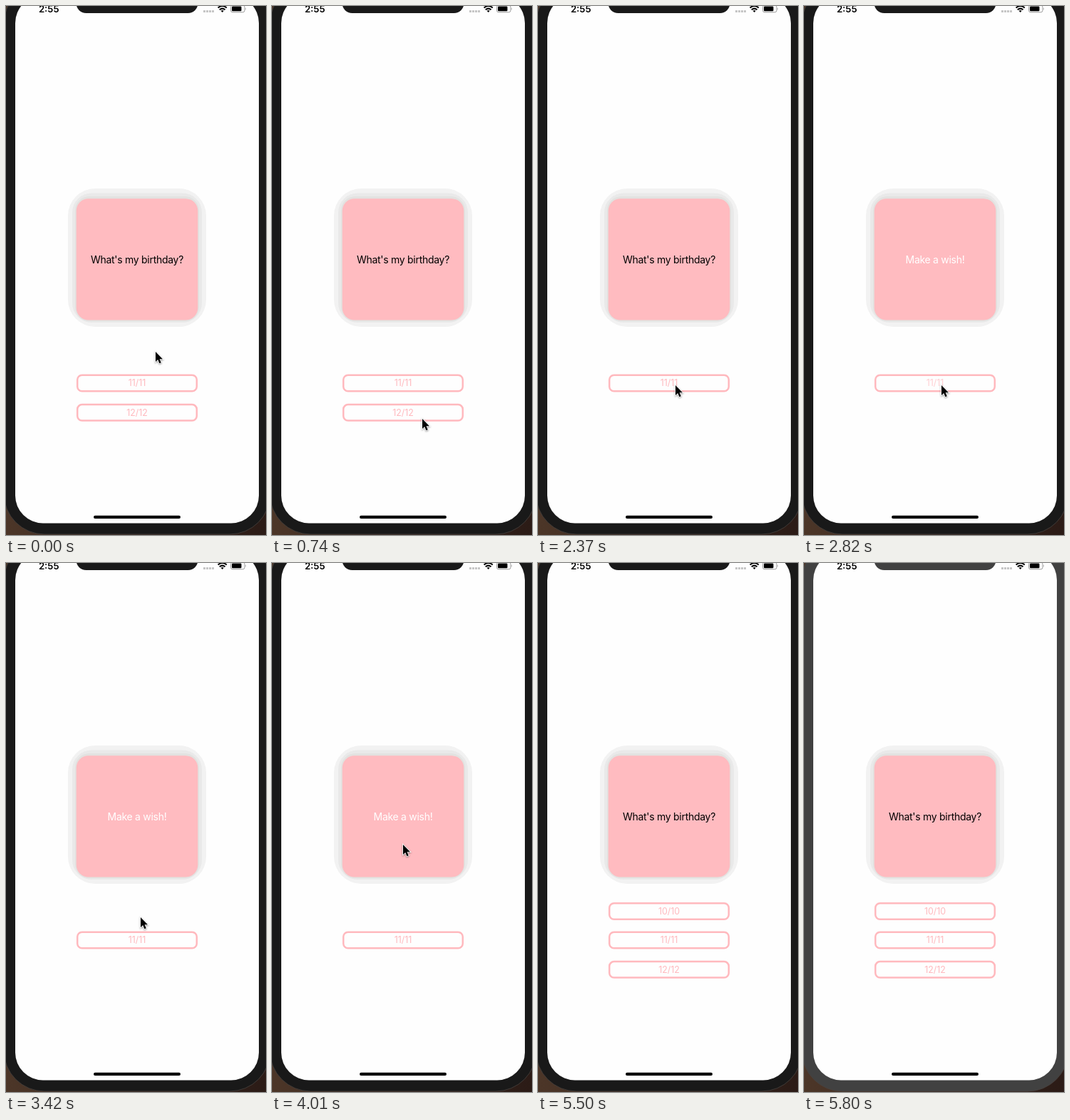
Write an HTML page that moves like this. It is 365x742 px and loops after 5.9 s.

```html
<!DOCTYPE html>
<html lang="en">
<head>
<meta charset="utf-8">
<title>Birthday quiz</title>
<style>
  html, body { margin: 0; width: 100%; height: 100%; overflow: hidden; }
  body { background: linear-gradient(90deg, #4c3628, #2b1b16); }
  svg { display: block; width: 365px; height: 742px; }
  text { font: 14px Inter, sans-serif; text-anchor: middle; letter-spacing: -.28px; }

  .bezel, .cursor, .option, .prompt, .wish, .label {
    animation: 5.9s step-end infinite;
  }
  .bezel { fill: #191919; animation-name: bezel; }
  .prompt { animation-name: prompt; }
  .wish { fill: #fff; animation-name: wish; }
  .option rect { fill: none; stroke: #ffb9be; stroke-width: 2.5; }
  .option text { fill: #ffb9be; font-size: 12.4px; letter-spacing: 0; }
  .first { animation-name: first; }
  .last { animation-name: last; }
  .label { animation-name: press; }
  .cursor { animation-name: cursor; filter: drop-shadow(0 1px .8px #0006); }

  @keyframes bezel { 0% { fill: #191919 } 98.3%, 100% { fill: #414141 } }
  @keyframes first { 0% { opacity: 0 } 75.59%, 100% { opacity: 1 } }
  @keyframes last {
    0% { opacity: 1 }
    15.08% { opacity: .8 }
    17.62% { opacity: .5 }
    20.16% { opacity: .2 }
    22.71% { opacity: 0 }
    75.59%, 100% { opacity: 1 }
  }
  @keyframes press {
    0% { opacity: 1 }
    45.25% { opacity: .4 }
    47.79% { opacity: .7 }
    50.33%, 100% { opacity: 1 }
  }
  @keyframes prompt {
    0% { opacity: 1 }
    47.79% { opacity: 0 }
    75.59%, 100% { opacity: 1 }
  }
  @keyframes wish {
    0% { opacity: 0 }
    47.79% { opacity: 1 }
    75.59%, 100% { opacity: 0 }
  }
  @keyframes cursor {
    0% { transform: translate(210px, 485px) }
    5.08% { transform: translate(217px, 551px) }
    7.62% { transform: translate(215px, 587px) }
    12.54% { transform: translate(211px, 579px) }
    15.08% { transform: translate(210px, 575px) }
    32.71% { transform: translate(208px, 567px) }
    35.25% { transform: translate(201px, 548px) }
    37.79% { transform: translate(195px, 535px) }
    40.16% { transform: translate(193px, 532px) }
    57.96% { transform: translate(189px, 497px) }
    60.5% { transform: translate(187px, 455px) }
    63.05% { transform: translate(185px, 420px) }
    65.59% { transform: translate(184px, 402px) }
    67.96% { transform: translate(184px, 395px); opacity: 1 }
    83.22% { transform: translate(194px, 420px); opacity: 1 }
    85.76% { transform: translate(234px, 512px); opacity: 1 }
    88.13% { transform: translate(292px, 632px); opacity: 1 }
    90.67% { transform: translate(334px, 720px); opacity: 1 }
    93.22%, 100% { transform: translate(334px, 720px); opacity: 0 }
  }
</style>
</head>
<body>
<svg viewBox="0 0 365 742">
  <rect class="bezel" x="-3" y="-32" width="374" height="773" rx="57" stroke="#49433f" stroke-width=".8"/>
  <rect x="13" y="-15" width="342" height="740.5" rx="39" fill="#fefefe"/>
  <rect class="bezel" x="98.5" y="-30" width="171" height="40" rx="14"/>

  <text x="60.2" y="9" style="font-weight:600;font-size:13.2px;letter-spacing:0">2:55</text>
  <path d="M277 7.5H292" stroke="#c6c6c6" stroke-width="3" stroke-dasharray="3 1"/>
  <g fill="none" stroke="#000" stroke-width="2">
    <path d="M297.6 2.6Q303.7 -2.6 309.8 2.6M299.8 5.2Q303.7 2 307.6 5.2"/>
    <path d="M301.6 6.6Q303.7 5.2 305.8 6.6L303.7 9Z" fill="#000" stroke="none"/>
  </g>
  <rect x="315.5" y="-1" width="19.5" height="9.8" rx="2.6" fill="none" stroke="#999" stroke-width="1"/>
  <rect x="317" y=".6" width="13.5" height="6.6" rx="1.2"/>
  <path d="M336.2 2.4Q338 4 336.2 5.6Z" fill="#999"/>

  <rect x="87" y="256" width="194" height="194" rx="38" fill="#f2f2f2"/>
  <rect x="93" y="262.5" width="182" height="181.5" rx="27" fill="#e9e9e9"/>
  <rect x="97" y="267" width="174" height="175" rx="20" fill="#e2e2e0"/>
  <rect x="98.7" y="270.3" width="170.6" height="170.2" rx="17" fill="#ffbbc0"/>
  <text class="prompt" x="184" y="361">What's my birthday?</text>
  <text class="wish" x="184" y="361">Make a wish!</text>

  <g class="option first">
    <rect x="100.2" y="477.3" width="167.6" height="22.4" rx="6.5"/>
    <text x="184" y="493">10/10</text>
  </g>
  <g class="option">
    <rect x="100.2" y="517.8" width="167.6" height="22.4" rx="6.5"/>
    <text class="label" x="184" y="533.4">11/11</text>
  </g>
  <g class="option last">
    <rect x="100.2" y="559.1" width="167.6" height="22.4" rx="6.5"/>
    <text x="184" y="574.8">12/12</text>
  </g>

  <rect x="123" y="714.8" width="122" height="4.2" rx="2.1"/>
  <path class="cursor" d="M0 0V14L3.2 11 5.4 16.2 7.8 15.2 5.6 10.2H10Z"
        stroke="#fff" stroke-width="1.6" paint-order="stroke"/>
</svg>
</body>
</html>
```
